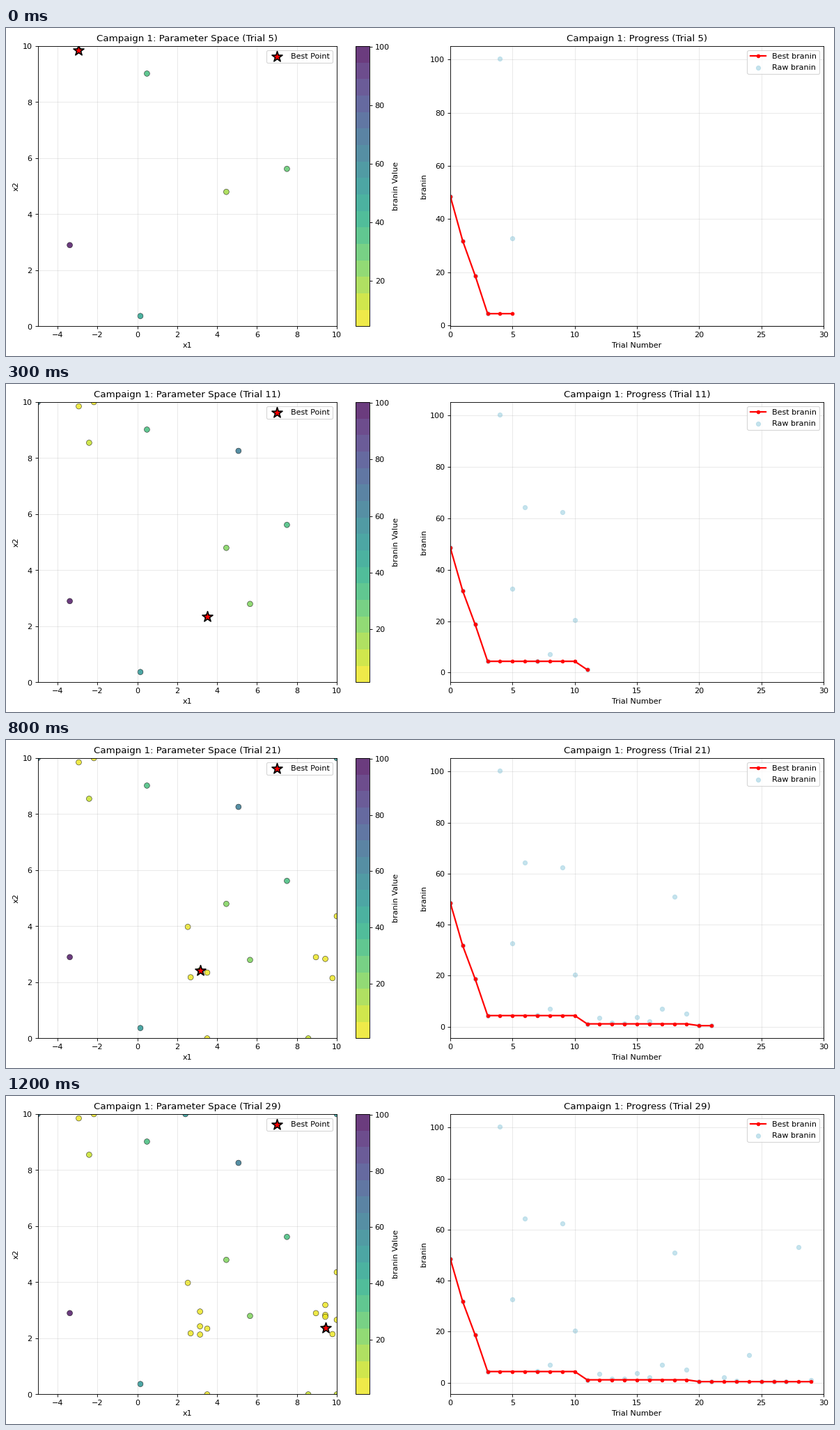
A matplotlib script for the animation above (1.3 s loop, 1189x471 px).

```python
import numpy as np
import matplotlib.pyplot as plt
from matplotlib.animation import FuncAnimation
from matplotlib.colors import ListedColormap

W, H, DPI = 1189, 471, 80
FRAMES, INTERVAL = 13, 100
FIRST_TRIAL, TRIALS_PER_FRAME = 5, 2
BANDS = 17

LEFT, RIGHT, BOTTOM, TOP = -5, 10, 0, 10
NEAR, FAR = (np.pi, 2.275), (3 * np.pi, 2.475)  # minima of the function

plt.rcParams["font.family"] = "DejaVu Sans"


def branin(x1, x2):
    bowl = x2 - 5.1 / (4 * np.pi**2) * x1**2 + 5 / np.pi * x1 - 6
    return bowl**2 + 10 * (1 - 1 / (8 * np.pi)) * np.cos(x1) + 10


def beside(basin, step):
    slope = 0.2 if basin is NEAR else -0.9
    return basin[0] + step, basin[1] + slope * step


def above(basin, rise):
    return basin[0], basin[1] + rise


def refine(basin, trial):
    return above(basin, 0.28 + 0.5 * np.cos(1.025 * trial + 2.2))


def search_path():
    """Wide scouting, then both basins and the walls, then fine steps."""
    scouts = [(0.15, 0.37), (7.5, 5.62), (4.46, 4.8),
              (-2.94, 9.85), (-3.39, 2.9), (0.48, 9.02)]
    spread = [(LEFT, TOP), (-2.18, TOP), (-2.42, 8.55), (5.07, 8.26), (5.65, 2.8)]
    basins = [beside(NEAR, 0.36), (2.53, 3.98), beside(NEAR, -0.47),
              beside(FAR, 0.36), (RIGHT, 4.36), beside(FAR, -0.47)]
    walls = [(8.57, BOTTOM), (RIGHT, TOP), (3.5, BOTTOM)]
    fine = [above(NEAR, 0.155), refine(FAR, 21), (RIGHT, 2.66),
            refine(NEAR, 23), (RIGHT, BOTTOM), above(FAR, -0.1),
            refine(NEAR, 26), refine(FAR, 27), (2.41, TOP), refine(FAR, 29)]
    return np.array(scouts + spread + basins + walls + fine)


points = search_path()
values = branin(*points.T)
best = np.minimum.accumulate(values)
trials = np.arange(len(values))

# The tiny surplus keeps the pixel size from being truncated down
fig = plt.figure(figsize=((W + 1e-4) / DPI, (H + 1e-4) / DPI), dpi=DPI)


def pixel_axes(left, right, top=26, bottom=428.5):
    return fig.add_axes([left / W, 1 - bottom / H,
                         (right - left) / W, (bottom - top) / H])


space = pixel_axes(45.5, 475)
bar = pixel_axes(501.8, 521.9)
progress = pixel_axes(638, 1174)

cmap = ListedColormap(plt.get_cmap("viridis_r")((np.arange(BANDS) + 0.5) / BANDS))
samples = space.scatter(*points.T, c=values, cmap=cmap, s=50, alpha=0.8,
                        edgecolors="black", linewidths=0.5)
star = space.scatter([0], [0], c="red", s=200, marker="*", edgecolors="black",
                     linewidths=1.5, label="Best Point")
space.set(xlim=(LEFT, RIGHT), ylim=(BOTTOM, TOP), xlabel="x1", ylabel="x2")
fig.colorbar(samples, cax=bar, label="branin Value")

best_line, = progress.plot([], [], "o-", color="red", lw=2, ms=4,
                           label="Best branin")
raw = progress.scatter(trials, values, s=30, color="lightblue", alpha=0.7,
                       label="Raw branin")
progress.set(xlim=(0, 30), xlabel="Trial Number", ylabel="branin")

for ax in (space, progress):
    ax.grid(True, alpha=0.3)
    ax.legend(loc="upper right")


def update(frame):
    last = FIRST_TRIAL + TRIALS_PER_FRAME * frame
    n = last + 1
    low, high = values[:n].min(), values[:n].max()
    margin = 0.05 * (high - low)

    samples.set_offsets(points[:n])
    samples.set_array(values[:n])
    samples.set_clim(low, high)
    star.set_offsets(points[[values[:n].argmin()]])

    best_line.set_data(trials[:n], best[:n])
    raw.set_offsets(np.column_stack((trials[:n], values[:n])))
    progress.set_ylim(low - margin, high + margin)

    space.set_title(f"Campaign 1: Parameter Space (Trial {last})")
    progress.set_title(f"Campaign 1: Progress (Trial {last})")
    return samples, star, best_line, raw


anim = FuncAnimation(fig, update, frames=FRAMES, interval=INTERVAL,
                     init_func=lambda: update(0), repeat=True, repeat_delay=0)
plt.show()
```
